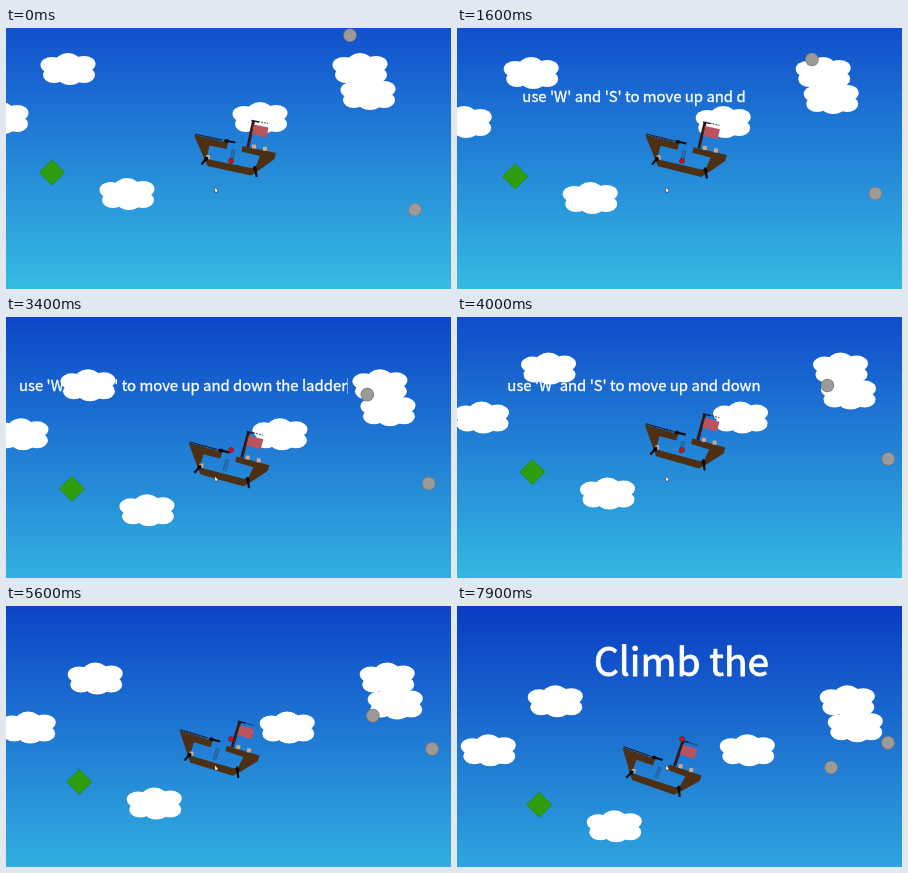
These frames come from a looping animation (445x261 px, 8 s). An HTML page with a canvas:

```html
<!DOCTYPE html>
<html lang="en">
<head>
<meta charset="utf-8">
<title>Sky ship</title>
<style>
  html, body { margin: 0; width: 445px; height: 261px; overflow: hidden; background: #1450cc; }
  canvas { display: block; }
</style>
</head>
<body>
<canvas id="stage" width="445" height="261"></canvas>
<script>
const W = 445, H = 261, LOOP = 8000, STEP = 100;
const c = document.getElementById('stage').getContext('2d');
const FONT = '"Noto Sans CJK JP", "Noto Sans CJK SC", "Noto Sans CJK", "Noto Sans", sans-serif';
const HINT = "use 'W' and 'S' to move up and down the ladder";
const GOAL = 'Climb the';
const PIVOT = [229, 116];
const PLAYER = [225, 133];
const CLOUDS = [[62, 41], [354, 41], [362, 66], [254, 90], [-5, 90], [121, 166]];
const PUFFS = [[-16, -4, 11.5, 8], [0, -6, 13, 10], [16, -5, 11.5, 8],
               [-14, 6, 11, 8], [2, 8, 12, 8], [16, 6, 11, 8], [0, 0, 17, 9]];
// Ship shift on screen while the camera follows the player: [seconds, x, y]
const PATH = [[0, 0, 0], [1.6, 0, 1], [1.9, 0, 1], [2.7, -3, 12], [3.3, -6, 21], [3.5, -6, 21],
              [4.1, 0, -0.5], [4.4, 0, 1], [4.7, -2.5, 6], [5.35, -7, 20.5], [5.6, -15.5, 21],
              [6.35, -16, 17.5], [7, -20, 25.5], [7.9, -24, 39.5]];

const lerp = (a, b, f) => a + (b - a) * f;

function shipAt(t) {
  const i = Math.max(1, PATH.findIndex(p => p[0] >= t));
  const a = PATH[i - 1], b = PATH[i];
  const f = (t - a[0]) / (b[0] - a[0]);
  return [lerp(a[1], b[1], f), lerp(a[2], b[2], f)];
}

function poly(color, ...pts) {
  c.fillStyle = color;
  c.beginPath();
  for (const [x, y] of pts) c.lineTo(x, y);
  c.closePath();
  c.fill();
}

function line(color, width, x1, y1, x2, y2) {
  c.strokeStyle = color;
  c.lineWidth = width;
  c.beginPath();
  c.moveTo(x1, y1);
  c.lineTo(x2, y2);
  c.stroke();
}

function disc(color, x, y, r) {
  c.fillStyle = color;
  c.beginPath();
  c.arc(x, y, r, 0, Math.PI * 2);
  c.fill();
}

function sky(rise) {
  const f = Math.min(1, Math.max(0, rise / 54));
  const mix = (a, b) => `rgb(${a.map((v, i) => Math.round(lerp(v, b[i], f))).join()})`;
  const g = c.createLinearGradient(0, 0, 0, H);
  g.addColorStop(0, mix([17, 80, 205], [10, 60, 195]));
  g.addColorStop(1, mix([54, 188, 226], [46, 165, 222]));
  c.fillStyle = g;
  c.fillRect(0, 0, W, H);
}

function cloud(x, y) {
  c.fillStyle = '#fff';
  for (const [dx, dy, rx, ry] of PUFFS) {
    c.beginPath();
    c.ellipse(x + dx, y + dy, rx, ry, 0, 0, Math.PI * 2);
    c.fill();
  }
}

function rock(x, y) {
  disc('#857a74', x, y, 6.8);
  disc('#9d9b9a', x, y, 6);
}

function diamond(x, y) {
  poly('#2a8a18', [x, y - 13], [x + 13, y], [x, y + 13], [x - 13, y]);
  poly('#2f9e0e', [x, y - 12], [x + 12, y], [x, y + 12], [x - 12, y]);
}

function cannon(x1, y1, x2, y2) {
  line('#0d0b10', 2.2, x1, y1, x2, y2);
  disc('#0d0b10', lerp(x1, x2, 0.25), lerp(y1, y2, 0.25), 2);
}

function crate(x, y) {
  c.fillStyle = '#cfa88c';
  c.fillRect(x - 2, y - 2, 4, 4);
}

function ship(dx, dy, turn) {
  const wood = '#4d2f14', dark = '#20161c';
  c.save();
  c.translate(PIVOT[0] + dx, PIVOT[1] + dy);
  c.rotate(turn);
  c.translate(-PIVOT[0], -PIVOT[1]);

  // ladder
  line('#28507c', 0.8, 226.5, 121, 224, 133);
  line('#28507c', 0.8, 229, 121.5, 226.5, 133.5);
  for (let i = 0; i < 5; i++) {
    const x = 226.3 - i * 0.5, y = 122.5 + i * 2.4;
    line('#28507c', 0.6, x, y, x + 2.5, y + 0.5);
  }

  // mast, lookout and flag
  line(dark, 3, 247.5, 93, 242, 119);
  line('#6b2a24', 0.8, 247.5, 96, 243, 118);
  poly('#b9545f', [248, 96.5], [262.5, 99.5], [260.5, 109.5], [246, 106.5]);
  line(dark, 1.3, 245.5, 92.5, 253, 94);
  c.setLineDash([2, 1]);
  line(dark, 0.8, 252, 93.5, 262, 95.5);
  c.setLineDash([]);

  // hull
  poly(wood, [188, 107], [222, 114.5], [220.5, 121], [203.5, 117.5], [200.5, 131],
    [245, 140], [249.5, 139], [254, 128], [235.5, 123.5], [236.5, 118], [270, 125],
    [268.5, 131], [252, 143], [245, 147.5], [201.5, 138]);
  line(dark, 0.9, 189, 106, 217, 112);
  c.setLineDash([1, 2]);
  line(dark, 1.2, 190, 107, 216, 112.7);
  c.setLineDash([]);

  crate(202, 129);
  crate(248, 118.5);
  crate(259, 120.8);
  cannon(218, 112.5, 229.5, 114.5);
  cannon(201.5, 129, 195.5, 136.5);
  cannon(248.5, 138, 250.8, 149);
  c.restore();
}

function player() {
  const [x, y] = PLAYER;
  disc('#7c1420', x, y, 2.7);
  disc('#d5101c', x, y, 2.1);
}

function pointer(x, y) {
  poly('#5a4a58', [x - 1.4, y - 3.5], [x + 2.6, y + 1], [x + 0.8, y + 3], [x - 1.4, y + 2.4]);
  poly('#fff', [x - 0.9, y - 2.3], [x + 1.7, y + 0.8], [x + 0.4, y + 2], [x - 0.9, y + 1.6]);
}

function write(text, x, y, size) {
  c.font = `400 ${size}px ${FONT}`;
  c.textAlign = 'center';
  c.textBaseline = 'alphabetic';
  c.fillStyle = c.strokeStyle = '#fff';
  c.lineWidth = size * 0.022;
  c.lineJoin = 'round';
  c.fillText(text, x, y);
  c.strokeText(text, x, y);
}

function captions(k) {
  const typed = Math.min(2 * k, HINT.length, 47 - 4 * (k - 37));
  if (typed > 0) write(HINT.slice(0, typed), 177, 74, 14.9);
  if (typed === HINT.length) line('rgba(255,255,255,.6)', 0.8, 341.5, 61, 341.5, 77);
  const big = 2 * (k - 75) + 1;
  if (big > 0) write(GOAL.slice(0, big), 224.5, 69.5, 38.9);
}

function draw(ms) {
  const k = Math.floor(ms / STEP), t = k * STEP / 1000;
  const [sx, sy] = shipAt(t);
  const ox = sx + 7.63 * t, oy = sy + 1.87 * t;
  sky(oy);
  for (const [x, y] of CLOUDS) cloud(x + ox, y + oy);
  diamond(46 + ox, 144.5 + oy);
  rock(344 - 0.78 * t + ox, 7.3 + 12.65 * t + oy);
  rock(409 - 1.8 * t + ox, 181.7 - 12.55 * t + oy);
  ship(sx, sy, 0.0155 * t);
  player();
  pointer(210, 162);
  captions(k);
}

const start = performance.now();
function tick() {
  draw((performance.now() - start) % LOOP);
  requestAnimationFrame(tick);
}
tick();
</script>
</body>
</html>
```
